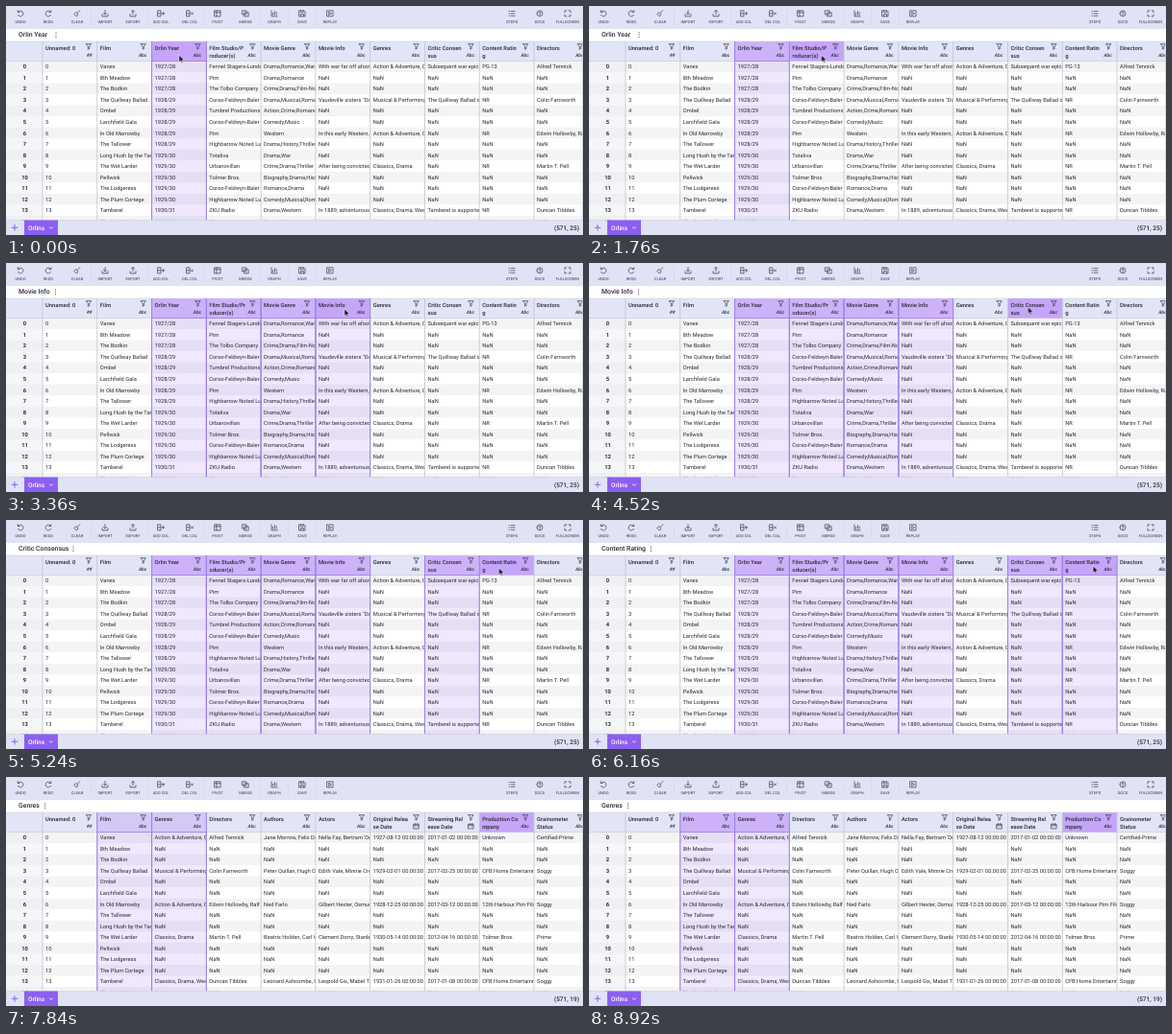
Write an HTML page that moves like this. It is 600 by 239 pixels and loops after 8960 ms.

```html
<!DOCTYPE html>
<html lang="en">
<head>
<meta charset="utf-8">
<title>Column selection</title>
<style>
html, body { margin: 0; width: 100%; height: 100%; overflow: hidden; background: #fff; }
#stage { display: block; width: 600px; height: 239px; font-family: Roboto, sans-serif; text-rendering: geometricPrecision; fill: #2b2b36; }
text { white-space: pre; }
.cell { font-size: 5.72px; }
.head { font-size: 5.85px; font-weight: 500; }
.index { font-size: 5.8px; font-weight: 700; text-anchor: middle; }
.type { font-size: 4.9px; font-weight: 500; font-style: italic; text-anchor: end; }
.tool { font-size: 4.1px; text-anchor: middle; fill: #3c3d50; }
.title { font-size: 6.9px; font-weight: 500; }
.icon { fill: none; stroke: #45465a; stroke-width: .75; stroke-linejoin: round; stroke-linecap: round; }
</style>
</head>
<body>
<svg id="stage" viewBox="0 0 600 239"></svg>
<script>
const LOOP = 8960;
const X0 = 38, COL = 56.78, TOP = 57.5, ROW = 11.54, HEAD = 37, FOOT = 223.5, ROWS = 15;
const stage = document.getElementById('stage');
const colX = i => X0 + COL * i;
const range = n => [...Array(n).keys()];

// Tracks collect opacity steps: [[time, value], ...] with an optional fade.
const tracks = [];
const track = (steps, fade = 0) => {
  tracks.push({ steps, fade });
  return `data-track="${tracks.length - 1}"`;
};
const between = (from, to) => [[0, from ? 0 : 1], ...(from ? [[from, 1]] : []), ...(to ? [[to, 0]] : [])];

const rect = (x, y, w, h, fill, more = '') => `<rect x="${x}" y="${y}" width="${w}" height="${h}" fill="${fill}" ${more}/>`;
const text = (x, y, str, cls, more = '') => `<text x="${x}" y="${y}" class="${cls}" ${more}>${str}</text>`;
const icon = (x, y, d) => `<path class="icon" transform="translate(${x} ${y})" d="${d}"/>`;

// Values for the rows that have review data; the rest are NaN.
const FILLED = [0, 3, 6, 9, 13];
const sparse = str => {
  const vals = str.split('|');
  return range(ROWS).map(r => FILLED.includes(r) ? vals[FILLED.indexOf(r)] : 'NaN');
};
const list = str => str.split('|');
const col = (label, rows, type = 'Abc', wide) => ({ label, rows, type, wide });

const unnamed = col('Unnamed: 0', range(ROWS), '##');
const film = col('Film', list('Vanes|8th Meadow|The Bodkin|The Quillway Ballad|Ombel|Larchfield Gala|In Old Marrowby|The Tallower|Long Hush by the Tannery|The Wet Larder|Pellwick|The Lodgeress|The Plum Cortege|Tamberel|The Fog Warden'));
const genres = col('Genres', sparse('Action & Adventure, Classics|Musical & Performing Arts|Action & Adventure, Classics|Classics, Drama|Classics, Drama, Western'));
const directors = col('Directors', sparse('Alfred Tennick|Colin Farnworth|Edwin Hollowby, Ralf|Martin T. Pell|Duncan Tibbles'));

const before = [
  unnamed, film,
  col('Orlin Year', range(ROWS).map(r => r < 3 ? '1927/28' : r < 8 ? '1928/29' : r < 13 ? '1929/30' : '1930/31')),
  col('Film Studio/P|roducer(s)', list('Fennel Stagers-Lunde|Pim|The Tolbo Company|Corso-Feldwyn-Baler|Tumbrel Productions|Corso-Feldwyn-Baler|Pim|Highbarrow Noted Lu|Totaliva|Urbanovillan|Tolmer Bros.|Corso-Feldwyn-Baler|Highbarrow Noted Lu|ZKU Radio|Pim'), 'Abc', 'Film Studio/Pr|oducer(s)'),
  col('Movie Genre', list('Drama,Romance,War|Drama,Romance|Crime,Drama,Film-Noir|Drama,Musical,Romance|Action,Crime,Romance|Comedy,Music|Western|Drama,History,Thriller|Drama,War|Crime,Drama,Thriller|Biography,Drama,History|Romance,Drama|Comedy,Musical,Romance|Drama,Western|Drama,War')),
  col('Movie Info', sparse('With war far off afoot, two|Vaudeville sisters "Do" and|In this early Western, a|After being convicted of|In 1889, adventurous man')),
  genres,
  col('Critic Consen|sus', sparse('Subsequent war epics may|The Quillway Ballad is|NaN|NaN|Tamberel is supported by')),
  col('Content Ratin|g', sparse('PG-13|NR|NR|NR|NR')),
  directors
];

const clock = s => sparse(s.split('|').map(d => d + ' 00:00:00').join('|'));
const after = [
  unnamed, film, genres, directors,
  col('Authors', sparse('Jane Morrow, Felix Dunn|Peter Quillan, Hugh Orr|Ned Farlo|Beatrix Holden, Carl Voss|Leonard Ashcombe, Edna')),
  col('Actors', sparse("Nella Fay, Bertram 'Dot'|Edith Vale, Minnie Crewe|Gilbert Hexter, Osmund|Clement Dorry, Stanley|Leopold Gix, Mabel Torr")),
  col('Original Relea|se Date', clock('1927-08-12|1929-02-01|1928-12-25|1930-05-14|1931-01-26'), 'date'),
  col('Streaming Rel|ease Date', clock('2017-01-02|2017-02-25|2017-03-12|2012-04-16|2017-01-08'), 'date'),
  col('Production Co|mpany', sparse('Unknown|CFB Home Entertainment|12th Harbour Pim Film|Tolmer Bros.|CFB Home Entertainment')),
  col('Grainometer|Status', sparse('Certified-Prime|Soggy|Soggy|Prime|Soggy'))
];

const DELETE = 7840;
const pickBefore = { 2: 0, 3: 3280, 4: 3280, 5: 3280, 7: 4800, 8: 5700 };
const hoverBefore = { 2: [0, 1520], 3: [1520, 1940], 4: [1940, 2470], 5: [2470, 4130], 6: [4130, 4410], 7: [4410, 5120], 8: [5120, 0] };
const pickAfter = { 1: 0, 2: 0 };
const hoverAfter = { 8: [0, 0] };

const lines = (label, more = '') => list(label).map((s, i) => text(3, 8.6 + 8 * i, s, 'head', more)).join('');

function column(c, i, picked) {
  const funnel = icon(48, 5.2, 'M-2.6 -2.6H2.6L.7 0V2.4L-.7 3V0Z');
  const type = c.type === 'date'
    ? icon(48, 14.3, 'M-2.6 -2H2.6V2.6H-2.6ZM-2.6 -.5H2.6M-1.3 -2.8V-1.6M1.3 -2.8V-1.6')
    : text(51.5, 16.4, c.type, 'type');
  const label = c.wide
    ? lines(c.label, track(between(0, picked))) + lines(c.wide, track(between(picked, 0)))
    : lines(c.label);
  const cells = c.rows.map((s, r) => text(3, TOP - HEAD + ROW * r + 7.8, s, 'cell')).join('');
  return `<svg x="${colX(i)}" y="${HEAD}" width="${COL}" height="${FOOT - HEAD}">${label}${funnel}${type}${cells}</svg>`;
}

function table(cols, picks, hovers, isLater) {
  let out = '';
  for (const [i, at] of Object.entries(picks)) {
    const x = colX(+i), glow = isLater ? track([[0, .6], [8760, 1]], 160) : '';
    out += `<g ${track(between(at, 0), at ? 80 : 0)}>`
      + rect(x, HEAD, COL, TOP - HEAD, '#cdb2fa', glow)
      + rect(x, TOP, COL, FOOT - TOP, '#8a4ff0', 'fill-opacity=".13"') + '</g>';
  }
  for (const [i, [from, to]] of Object.entries(hovers))
    out += rect(colX(+i), HEAD, COL, TOP - HEAD, '#c5a5f9', track(between(from, to), 100));
  out += cols.map((c, i) => column(c, i, picks[i])).join('');
  out += range(11).map(i => rect(colX(i) - .4, HEAD, .8, FOOT - HEAD, '#c3c5d0')).join('');
  for (const [i, at] of Object.entries(picks)) {
    const x = colX(+i);
    out += `<g ${track(between(at, 0), at ? 80 : 0)}>`
      + [x, x + COL].map(e => rect(e - .5, HEAD, 1, FOOT - HEAD, '#a17de8')).join('')
      + rect(x, TOP - .4, COL, .8, '#a17de8') + '</g>';
  }
  return `<g ${track(isLater ? between(DELETE, 0) : between(0, DELETE))}>${out}</g>`;
}

const GRID = 'M-3 -3H3V3H-3ZM-3 -1H3M-1 -3V3';
const tools = [
  ['UNDO', 15, 'M-2.4 -1.6A2.9 2.9 0 1 1 -2.6 1.5M-2.8 -3.2V-1.3H-.9'],
  ['REDO', 44, 'M2.4 -1.6A2.9 2.9 0 1 0 2.6 1.5M2.8 -3.2V-1.3H.9'],
  ['CLEAR', 74, 'M2.8 -3.2L.2 -.4M-1 -1L1 .9L-.6 3.2L-3 .8Z'],
  ['IMPORT', 103, 'M-3 .8V3H3V.8M0 -3.4V1M-1.6 -.6L0 1L1.6 -.6'],
  ['EXPORT', 132, 'M-3 .8V3H3V.8M0 1V-3.4M-1.6 -1.8L0 -3.4L1.6 -1.8'],
  ['ADD COL', 161, 'M-3 -3H0V3H-3ZM-3 0H0M1.4 0H3.8M2.6 -1.2V1.2'],
  ['DEL COL', 191, 'M-3 -3H0V3H-3ZM-3 0H0M1.5 -1L3.5 1M3.5 -1L1.5 1'],
  ['PIVOT', 220, GRID],
  ['MERGE', 249, 'M-3.2 -3H1V1H-3.2ZM-1 -1H3.2V3H-1Z'],
  ['GRAPH', 279, 'M-3 -3V3H3.2M-1.4 1.4V-.4M.4 1.4V-2.4M2.2 1.4V-1.2'],
  ['SAVE', 308, 'M-3 -3H2L3 -2V3H-3ZM-1.6 -3V-1H1.2V-3M-1.6 3V.8H1.6V3'],
  ['REPLAY', 337, 'M-3 -3H3V3H-3ZM-1 -1.5L1.5 0L-1 1.5Z'],
  ['STEPS', 526, 'M-3 -2.4H-2.6M-1 -2.4H3M-3 0H-2.6M-1 0H3M-3 2.4H-2.6M-1 2.4H3'],
  ['DOCS', 555, 'M-3 0A3 3 0 1 1 3 0A3 3 0 1 1 -3 0M-1 -.8A1 1 0 1 1 0 .3V.7M0 1.7V1.8'],
  ['FULLSCREEN', 584, 'M-3 -1.2V-3H-1.2M1.2 -3H3V-1.2M3 1.2V3H1.2M-1.2 3H-3V1.2']
];

// label, x of the menu dots, visible from, visible to
const titles = [
  ['Orlin Year', 52, 0, 3320],
  ['Movie Info', 51.5, 3320, 4800],
  ['Critic Consensus', 70, 4800, 5700],
  ['Content Rating', 64.5, 5700, DELETE],
  ['Genres', 40.5, DELETE, 0]
];

const BAR = '#dfe3f4', PURPLE = '#8b5ff0';
const toolbar = rect(0, 0, 600, 24, BAR)
  + [88, 147, 205.5, 264, 293, 322.5].map(x => rect(x, 3, .5, 17, '#cfd3e6')).join('')
  + tools.map(([s, x, d]) => icon(x, 7.8, d) + text(x, 17.6, s, 'tool')).join('');

const titleBar = titles.map(([s, x, from, to]) => `<g ${track(between(from, to))}>${text(13, 32.3, s, 'title')}`
  + [27.7, 30, 32.3].map(y => `<circle cx="${x}" cy="${y}" r=".55"/>`).join('') + '</g>').join('');

const sheet = rect(0, HEAD, 600, TOP - HEAD, '#e1e5f6')
  + range(ROWS).map(r => rect(0, TOP + ROW * r, 600, ROW, r % 2 ? '#fff' : '#f4f4f5')).join('')
  + rect(0, TOP, X0, FOOT - TOP, '#e9eaf0', 'fill-opacity=".45"')
  + rect(0, HEAD - .3, 600, .6, '#c9ccdb') + rect(0, TOP - .3, 600, .6, '#c3c5d0')
  + range(ROWS).map(r => text(19.5, TOP + ROW * r + 7.8, r, 'index')).join('');

const footer = rect(0, FOOT, 600, 239 - FOOT, BAR) + rect(0, FOOT, 600, .6, '#c9ccdb')
  + `<path d="M5.8 231.3H12.2M9 228.1V234.5" stroke="${PURPLE}" stroke-width="1"/>`
  + rect(19, FOOT, 35, 15.5, PURPLE)
  + text(23, 233.6, 'Orlins', 'title', 'style="fill:#fff;font-size:6.5px"')
  + '<path d="M45.2 230.6L47 232.4L48.8 230.6" fill="none" stroke="#fff" stroke-width=".9"/>'
  + [['(571, 25)', 0, DELETE], ['(571, 19)', DELETE, 0]].map(([s, from, to]) =>
    text(596, 233.5, s, 'title', `style="font-size:6.5px" text-anchor="end" ${track(between(from, to))}`)).join('');

const cursor = `<g ${track(between(0, 7180))}><path id="cursor" d="M0 0V7.2L1.7 5.7L2.8 8.2L4 7.7L2.9 5.3H5.2Z" fill="#111" stroke="#fff" stroke-width=".5"/></g>`;

stage.innerHTML = rect(0, 0, 600, 239, '#fff') + toolbar + titleBar + sheet
  + table(before, pickBefore, hoverBefore, false)
  + table(after, pickAfter, hoverAfter, true)
  + rect(599.2, HEAD, .8, FOOT - HEAD, '#d4d6e0') + footer + cursor;

const timing = { duration: LOOP, iterations: Infinity };

stage.querySelectorAll('[data-track]').forEach(el => {
  const { steps, fade } = tracks[el.dataset.track];
  if (steps.length === 1) { el.style.opacity = steps[0][1]; return; }
  const frames = [{ offset: 0, opacity: steps[0][1] }];
  let last = steps[0][1];
  for (const [t, v] of steps.slice(1)) {
    frames.push({ offset: t / LOOP, opacity: last }, { offset: (t + fade) / LOOP, opacity: v });
    last = v;
  }
  frames.push({ offset: 1, opacity: last });
  el.animate(frames, timing);
});

// time, x, y, easing towards the next point
const path = [
  [0, 180, 51.2], [40, 180, 51.2], [120, 180.5, 51.8], [960, 180.5, 51.8], [1120, 182, 51.5],
  [1320, 182, 51.5, 'ease-in'], [1760, 241.5, 51.2], [2200, 300, 49], [2240, 302, 48.8, 'ease-out'],
  [2720, 344.5, 47.2, 'ease-out'], [3120, 352, 48], [3960, 352, 48, 'ease-in-out'],
  [4520, 456.5, 45.8, 'ease-out'], [4840, 462, 48], [4960, 462, 48, 'ease-in-out'],
  [5240, 512.5, 50, 'ease-out'], [5760, 522, 49], [5960, 522, 49, 'ease-in-out'],
  [6280, 525, 47.5], [6800, 525, 47.5, 'ease-in-out'], [7200, 527, 46.5], [LOOP, 527, 46.5]
];
document.getElementById('cursor').animate(path.map(([t, x, y, easing = 'linear']) =>
  ({ offset: t / LOOP, transform: `translate(${x}px, ${y}px)`, easing })), timing);
</script>
</body>
</html>
```
